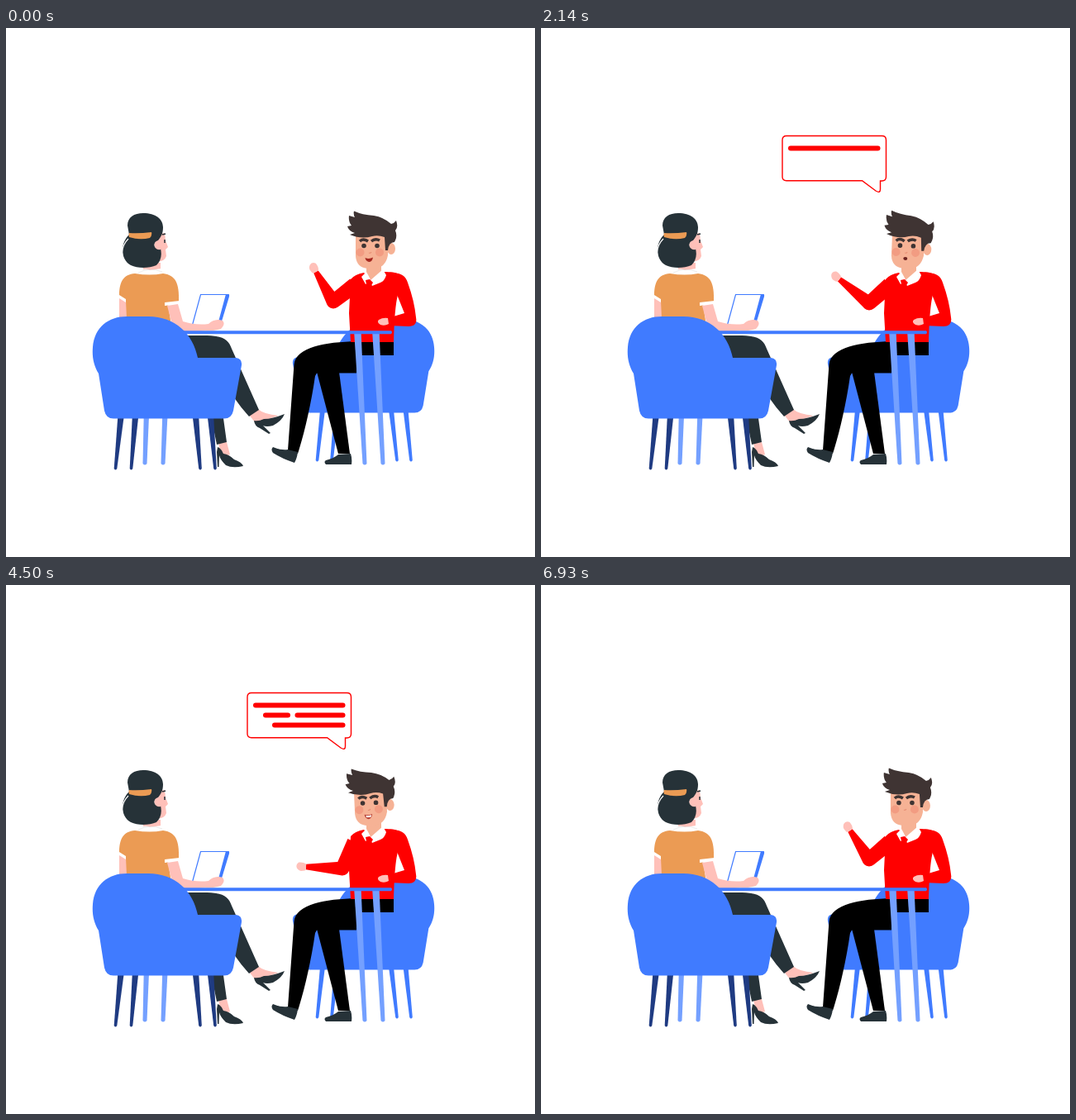
Recreate the animation shown at these times as an HTML page. Size 640 px wide and 640 px high, loop 7000 ms.

```html
<!DOCTYPE html>
<html lang="en">
<head>
<meta charset="utf-8">
<title>Conversation at a table</title>
<style>
  html, body { margin: 0; width: 100%; height: 100%; overflow: hidden; background: #fff; }
  svg { display: block; width: 100vw; height: 100vh; }
  .blue { fill: #407bff; } .navy { fill: #1f3b82; } .pale { fill: #74a0ff; }
  .dark { fill: #263238; } .skin { fill: #ffc0b9; } .tan { fill: #f6b295; }
  .orange { fill: #eb9b54; } .red { fill: #f00; } .hair { fill: #3f3433; } .white { fill: #fff; }
  .ink { fill: none; stroke: #f00; }
</style>
</head>
<body>
<svg viewBox="0 0 640 640" preserveAspectRatio="xMidYMid meet">
  <defs>
    <path id="chair" d="M112 418C106 408 104 398 105 386C107 362 124 349 146 349H172C205 349 226 370 232 399H278Q286 400 285 408L275 463Q273 472.500 264 472.500H130Q121 472.500 119 463Z"/>
  </defs>

  <!-- his chair -->
  <g id="rightLegs" class="blue"></g>
  <use href="#chair" class="blue" transform="matrix(-.95 0 0 .919 617.750 31.200)"/>

  <!-- his legs -->
  <path d="M376 416H403L416 515H402Z"/>
  <path d="M469 379V396H424V417.500H376L374 421C369 456 361 490 353 515L341 511L348.500 407C351 386 386 380 424 379Z"/>
  <path class="dark" d="M323 507Q332 511 341 510L353 513Q352 521 349 526Q334 521 323 514Q320 510 323 507ZM387 523Q396 521 402 516L417 515Q419 521 418 528H387Q384 525 387 523Z"/>

  <!-- his body -->
  <path class="tan" d="M436 285H454V300L445 307L436 300Z"/>
  <path class="red" d="M417 304Q422 298 433 296L442 305L457 295C474 295 481 298 483 307L474 323Q470 338 469 380H417L415 345Z"/>
  <path id="sideArm" class="red"/>
  <path id="sideHand" class="skin" d="M462 351Q456 350 451 353Q448 356 453 359Q458 361 463 358Z"/>
  <path class="white" d="M430 301L436 295L442 306L435 310ZM440 306L456 292L460 299Q458 306 453 308L443 312Z"/>
  <path class="red" d="M435 305L440 304L444 308L441 313L436 310Z"/>
  <path id="frontArm" class="red"/>
  <path id="frontHand" class="skin" d="M0 -3.500Q-4 -6 -9 -5Q-13 -2 -11 2Q-8 6 -4 5Q-1 5 0 3.500Z"/>

  <g id="head">
    <ellipse class="tan" cx="466" cy="267" rx="5" ry="7"/>
    <path class="tan" d="M423 248V276Q424 290 438 291H446Q459 290 462 275V248Z"/>
    <g fill="#f29c82"><circle cx="428.500" cy="271.500" r="5"/><circle cx="452" cy="271.500" r="5"/></g>
    <path class="hair" d="M421 221.500Q431 226 445 227Q457 229 466 237Q470 236 472 233Q475 241 471 245Q474 252 470 259Q463 259 462 269H459L458 253Q450 250 443 252Q430 256 416 250L422 248Q415 246 413 240L418 239Q414 234 415 227L422 229Q420 225 421 221.500Z"/>
    <path fill="none" stroke="#3f3433" stroke-width="3.400" d="M428 258Q432 254 438 258M442 258Q447 254 452 257"/>
    <g class="hair"><circle cx="433" cy="263.500" r="2.800"/><circle cx="449" cy="263.500" r="2.800"/></g>
    <path fill="none" stroke="#e58d73" d="M439 272Q441 273 442 271"/>
    <g id="mouths">
      <path d="M434.500 278Q439.500 280 444 277.500Q443 283 439 283Q435 282 434.500 278Z" fill="#a52820"/>
      <g><path d="M434.500 277.500Q439 279 444 277Q443 283 439 283Q435 282 434.500 277.500Z" fill="#b43b30"/><path class="white" d="M436 278.500Q440 279.500 443 278L442 281H437Z"/></g>
      <g><path d="M434.500 277.500Q439 280 444.500 277Q443 282.500 439 282.500Q436 281.500 434.500 277.500Z" fill="#d12b25"/><path class="white" d="M436 278.300Q440 280 443 278L440 280.500Z"/></g>
      <g></g>
      <ellipse cx="440" cy="279" rx="2.500" ry="2" fill="#6d2420"/>
    </g>
  </g>

  <!-- table -->
  <g id="tableLegs" class="pale"></g>

  <!-- woman -->
  <path class="skin" d="M137 325L147 329L148 355H137ZM166 284H187V298H166ZM179 250L192 248L193 257L196 265L193 268L194 276Q192 283 181 283Z"/>
  <path class="white" d="M160 297Q166 289 174 293L188 291L192 299Q174 303 160 297Z"/>
  <path fill="none" stroke="#ddd" stroke-width=".6" d="M160 296Q174 289 189 295"/>
  <path class="dark" d="M147 239C147 229 155 224 166 224C181 224 190 231 190 241C190 250 187 253 184 257Q178 259 180 265Q185 268 187 267Q190 279 182 287C173 291 159 291 151 287C138 280 138 260 149 250Z"/>
  <path class="skin" d="M187 268Q180 269 179.500 262Q181 256 187 258Z"/>
  <path class="orange" d="M149 248Q160 249 176 247Q177 251 174 254Q162 257 149 253Q148 250 149 248Z"/>
  <path fill="none" stroke="#fff" stroke-width="1.200" d="M148 255C138 265 139 279 146 285"/>
  <path fill="none" stroke="#263238" stroke-width="1.500" d="M189 250L193 249M192 256V260"/>
  <path class="orange" d="M137 324C137 307 142 298 156 297Q174 300 190 297C205 299 210 308 209 332L196 334L202 373H147L145 330Z"/>
  <path class="white" d="M137 323L145 328L145 332L137 327ZM192 332L210 330V334L192 336Z"/>
  <path class="white" stroke="#407bff" stroke-width="1.200" d="M225 361L235.500 322.500H269L258 361Z"/>
  <path class="blue" d="M266 322H269.500Q270.500 323 270 325L260 358L256 359Z"/>
  <path class="skin" d="M195 336L208 334L214 355Q230 360 245 358Q253 351 262 354Q266 358 260 364Q250 367 241 366Q226 369 211 367Q203 365 200 355Z"/>
  <path class="skin" d="M294 468L305 461Q311 467 330 469L302 478ZM257 502L267 501L271 516L261 520Z"/>
  <path class="dark" d="M214 372H238C262 372 269 376 273 388L306 462L294 470Q274 448 260 420H214ZM247 465H262L267 501L255 504Z"/>
  <path class="dark" d="M300 475Q306 476 312 473Q322 473 337 467Q334 475 323 481Q315 483 311 481L320 490L318 491L307 484Q301 482 300 475ZM256 507Q260 508 263 515Q270 516 276 522Q285 525 287 530Q274 533 266 529Q259 522 258 517L257.500 531H256L255 513Z"/>

  <g id="leftLegs" class="navy"></g>
  <path class="blue" d="M205 366.200H466Q468 368 466 370.200H205Z"/>
  <use href="#chair" class="blue"/>

  <g id="bubble">
    <path class="ink" stroke-width="1.400" d="M297 130.500H412.500Q417.500 130.500 417.500 135.500V180Q417.500 185 412.500 185H410.500V195Q410.500 200.500 405 197L388.500 184.700H297Q292 184.700 292 180V135.500Q292 130.500 297 130.500Z"/>
    <g id="lines" class="ink" stroke-width="6" stroke-linecap="round"></g>
  </g>
</svg>
<script>
  const LOOP = 7000, BEAT = LOOP / 49;
  const $ = id => document.getElementById(id);
  const clamp = v => Math.max(0, Math.min(1, v));
  const ramp = (t, from, to) => clamp((t - from) / (to - from));
  const set = (el, name, value) => el.setAttribute(name, value);

  // Tapered furniture leg from (x, y) to (x2, y2).
  const leg = (x, y, x2, y2, a, b) =>
    `<path d="M${x - a} ${y}H${x + a}L${x2 + b} ${y2 - 1}Q${x2} ${y2 + 2} ${x2 - b} ${y2 - 1}Z"/>`;
  const legs = (id, y, y2, a, b, pairs) => {
    $(id).innerHTML = pairs.map(([x, x2]) => leg(x, y, x2, y2, a, b)).join('');
  };
  legs('rightLegs', 462, 524, 3, 1.8, [[383, 376.5], [400, 394], [466, 473], [483.5, 490]]);
  legs('leftLegs', 470, 534, 3.7, 1.8, [[139, 132.5], [156.5, 151.5], [229.5, 235], [247.5, 253]]);
  $('tableLegs').innerHTML =
    [[425.5, 434], [447.5, 456]].map(([x, x2]) => leg(x, 370, x2, 528, 4.2, 2.5)).join('') +
    [[170, 168], [192.5, 190]].map(([x, x2]) => leg(x, 465, x2, 528, 3.2, 2.5)).join('');

  // Each written line grows leftwards from its right end.
  const strokes = [
    { y: 145.6, left: 302, right: 407.5, from: 1430, to: 2070 },
    { y: 157.6, left: 352.5, right: 407.5, from: 2140, to: 2790 },
    { y: 157.6, left: 314, right: 341, from: 2860, to: 3500 },
    { y: 169.6, left: 325, right: 407.5, from: 3570, to: 4290 }
  ];
  for (const s of strokes) {
    s.el = $('lines').appendChild(document.createElementNS('http://www.w3.org/2000/svg', 'path'));
  }

  // Rows: time, elbow x, elbow y, wrist x, wrist y.
  const armKeys = [
    [0, 396, 331, 375, 295], [1430, 398, 333, 374, 297], [2140, 397, 333, 361, 304],
    [3210, 395, 335, 355, 317], [4500, 407, 343, 363, 341], [5210, 400, 338, 355, 330],
    [6930, 397, 332, 374, 297], [7000, 396, 331, 375, 295]
  ];
  // Rows: time, tilt in degrees.
  const headKeys = [
    [0, 0], [900, -2.8], [1430, -1.7], [2140, 2.4], [2700, 2.6],
    [3210, 1.8], [4500, -2.4], [5210, -3], [6930, -.1], [7000, 0]
  ];
  const sideKeys = [[0, 0], [2210, 0], [3000, 1], [3400, 1], [4290, 0], [7000, 0]];

  function sample(keys, t) {
    const i = Math.max(1, keys.findIndex(k => k[0] > t));
    const a = keys[i - 1], b = keys[i];
    const p = (1 - Math.cos(Math.PI * ramp(t, a[0], b[0]))) / 2;
    return a.slice(1).map((v, n) => v + (b[n + 1] - v) * p);
  }

  const disc = (x, y, r) => `M${x - r} ${y}a${r} ${r} 0 1 1 ${2 * r} 0a${r} ${r} 0 1 1 ${-2 * r} 0Z`;
  function limb(x, y, r, x2, y2, r2) {
    const d = Math.hypot(x2 - x, y2 - y), nx = (y - y2) / d, ny = (x2 - x) / d;
    return `M${x + nx * r} ${y + ny * r}L${x - nx * r} ${y - ny * r}` +
      `L${x2 - nx * r2} ${y2 - ny * r2}L${x2 + nx * r2} ${y2 + ny * r2}Z`;
  }

  function drawArms(t) {
    const [ex, ey, wx, wy] = sample(armKeys, t);
    set($('frontArm'), 'd', limb(422, 311, 9.5, ex, ey, 8.5) + disc(ex, ey, 8.5) +
      limb(ex, ey, 8.5, wx, wy, 3.2));
    const turn = Math.atan2(ey - wy, ex - wx) * 180 / Math.PI;
    set($('frontHand'), 'transform', `translate(${wx} ${wy}) rotate(${turn})`);

    const s = 9 * sample(sideKeys, t)[0];
    set($('sideArm'), 'd', `M462 297C477 295 483 299 486 308Q${494 - s / 2} 330 ${496 - s} 350` +
      `Q${498 - s} 361 ${487 - s} 361L${462 - s} 360V${351 - s / 4}L${482 - s} 345L472 320Z`);
    set($('sideHand'), 'transform', `translate(${-s} ${-s / 3})`);
  }

  function drawHead(t) {
    set($('head'), 'transform', `rotate(${sample(headKeys, t)[0]} 443 298)`);
    const shown = Math.floor(t / BEAT) % 5;
    [...$('mouths').children].forEach((m, i) => set(m, 'visibility', i === shown ? 'visible' : 'hidden'));
  }

  function drawBubble(t) {
    const size = ramp(t, 900, 1280) * (1 - ramp(t, 4935, 5315));
    set($('bubble'), 'visibility', size > .01 ? 'visible' : 'hidden');
    set($('bubble'), 'transform', `translate(410 199) scale(${size}) translate(-410 -199)`);
    for (const s of strokes) {
      const p = ramp(t, s.from, s.to);
      set(s.el, 'd', p > .01 ? `M${s.right} ${s.y}H${s.right + (s.left - s.right) * p}` : '');
    }
  }

  const start = performance.now();
  function draw() {
    const t = (performance.now() - start) % LOOP;
    drawArms(t);
    drawHead(t);
    drawBubble(t);
    requestAnimationFrame(draw);
  }
  draw();
</script>
</body>
</html>
```
